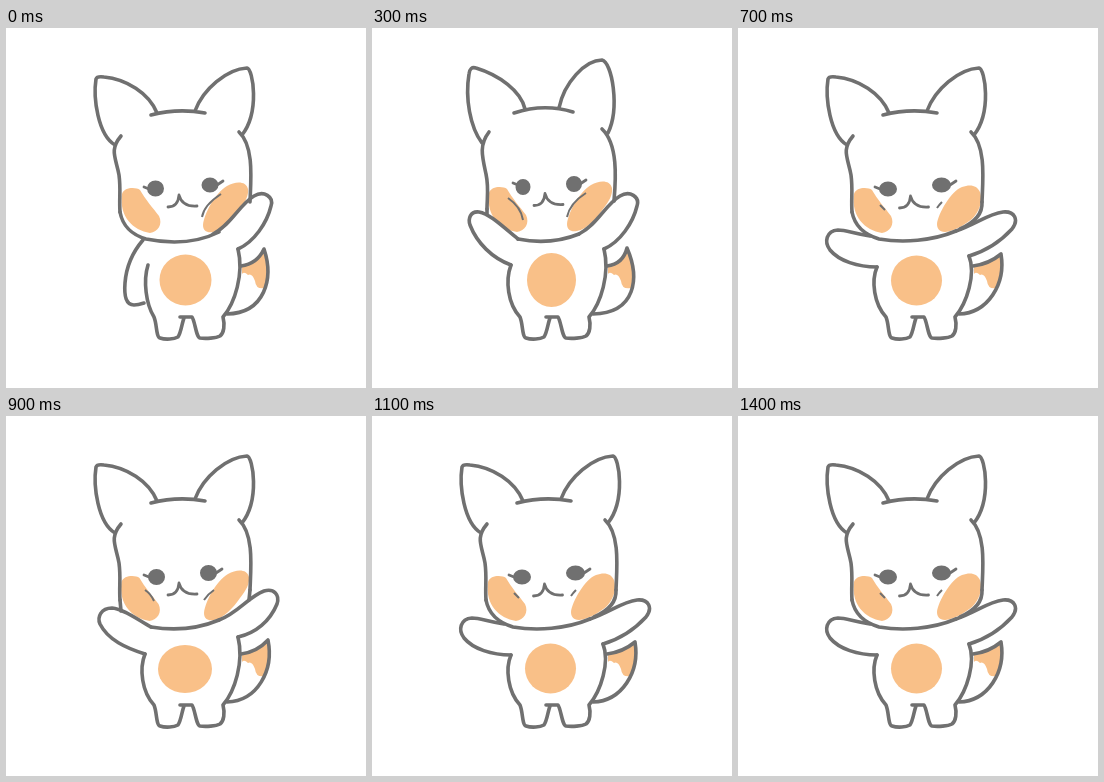
An HTML page that plays this animation: 360x360 px, repeating every 1500 ms.

```html
<!DOCTYPE html>
<html lang="en">
<head>
<meta charset="utf-8">
<title>Waving kitten</title>
<style>
  html, body { margin: 0; width: 100%; height: 100%; overflow: hidden; background: #fff; }
  svg { display: block; width: 100%; height: 100%; }
  .line { fill: none; stroke: #707070; stroke-width: 3.6; stroke-linecap: round; stroke-linejoin: round; }
  .face { stroke-width: 2.8; }
  .crease { stroke-width: 2; stroke-linecap: butt; }
  .orange { fill: #f9c088; }
  .eye { fill: #707070; }
</style>
</head>
<body>
<svg id="stage" viewBox="0 0 360 360"></svg>
<script>
const oval = (x, y, rx, ry) =>
  `M${x - rx} ${y}A${rx} ${ry} 0 1 1 ${x + rx} ${y}A${rx} ${ry} 0 1 1 ${x - rx} ${y}Z`;

const shift = (path, dx, dy) =>
  path.replace(/([\d.]+) ([\d.]+)/g, (_, x, y) => `${+x + dx} ${+y + dy}`);

const mix = (a, b, t) => {
  const to = b.match(/[\d.]+/g);
  let i = 0;
  return a.replace(/[\d.]+/g, n => +n + (to[i++] - n) * t);
};

const heads = {
  calm: "M109 117C92 107 87 70 90 51Q91 48 98 49C120 51 143 65 151 85" +
    "M189 83C197 61 221 41 241 40C247 41 254 84 236 107M145 87Q172 80 199 85" +
    "M115 108C103 122 110 130 113 147C115 162 113 170 114 184M233 104C248 118 245 150 244 174",
  up: "M110 115C98 99 93 70 97 46Q98 38 104 40C127 47 149 63 153 81" +
    "M187 80C192 55 213 32 230 32C240 34 248 80 236 105M142 85Q172 75 201 84" +
    "M117 104C107 117 110 128 114 146C117 160 115 170 115 181M230 101C246 116 244 150 242 173",
  drop: "M105 121C90 104 84 75 87 57Q89 52 95 54C118 55 141 68 149 86" +
    "M187 84C196 64 221 47 240 45C249 46 252 88 235 109M143 90Q172 82 199 89" +
    "M111 111C102 122 108 132 111 149C114 164 112 172 114 186M234 107C247 119 246 150 244 176"
};

const jaws = {
  wave: "M114 184C117 200 127 207 140 211C170 217 195 213 213 204",
  low: "M114 184C117 200 128 207 141 211C165 215 194 213 218 203M244 174Q245 191 222 201",
  up: "M115 181L115 186M146 211C170 216 192 212 207 206",
  mid: "M114 184L115 195M145 211C170 215 194 212 213 204M244 174L243 184"
};

const leftArms = {
  wave: "M137 212C125 226 120 242 119 255C118 268 120 277 128 277C131 277 135 276 138 275",
  up: "M146 211C130 198 118 186 107 184C98 183 96 191 98 197C105 215 120 230 139 237",
  low: "M132 208C114 205 108 202 100 202C88 203 86 214 92 222C101 233 120 239 139 239",
  mid: "M145 211C132 204 118 193 106 192C95 192 91 201 94 208C102 224 120 232 139 238"
};

const rightArms = {
  up: "M207 206C225 197 234 176 248 168C258 162 268 169 265 178C261 195 248 214 232 221",
  low: "M218 203C238 196 250 186 265 184C277 183 281 192 274 201C262 214 248 223 231 228",
  mid: "M213 204C232 197 242 181 258 175C268 172 274 179 271 188C264 205 250 217 232 221"
};

const legs = "M148 289C151 296 150 309 154 310C160 312 168 311 172 309C175 305 176 295 178 290" +
  "M174 289L186 289C189 293 190 309 194 310C200 311 210 310 214 308C218 305 219 297 217 289";
const body = (x, bend, y, top) =>
  `M${x} ${y}C${bend} 253 ${bend + 3} 276 148 289M${top > 225 ? 231 : 232} ${top}C238 246 229 275 217 289` + legs;

const tail = (x, y) => `M235 238Q251 236 ${x} ${y}C268 ${y + 30} ${264 - 1.75 * (x - 255)} 285 221 286`;
const tailTip = (x, y) => `M236 238Q251 236 ${x} ${y}Q264 ${y + 18} 259 260` +
  "Q250 262 249 253Q246 245 242 247Q238 243 236 246Z";

const cheekLeft = "M116 166C118 159 130 159 134 162C139 171 147 180 153 188C157 196 152 204 144 205C127 202 113 189 116 166Z";
const cheekFull = "M199 196C200 186 213 163 224 159C232 156 239 157 242 164C245 174 241 184 234 191C225 198 216 203 207 204C201 204 199 200 199 196Z";
const cheekCut = "M195 196C196 185 207 164 219 157C228 152 238 152 240 160C241 166 237 174 231 181C224 191 215 201 205 203C199 204 195 202 195 196Z";
const cheeks = (lx, ly, right, rx, ry) => shift(cheekLeft, lx, ly) + shift(right, rx, ry);

const lash = (lx, ly, rx, ry) => `M${lx} ${ly}L${lx + 5} ${ly + 2}M${rx} ${ry}L${rx + 6} ${ry - 4}`;
const mouth = (x, y) => `M${x - 11} ${y + 12}Q${x - 1} ${y + 12} ${x} ${y}Q${x + 3} ${y + 12} ${x + 18} ${y + 11}`;
const shortCrease = "M142 177Q144 179 147 182M199 180Q201 177 204 174";

const wave = {
  tailTip: tailTip(258, 221), tail: tail(258, 221),
  belly: oval(179.5, 252, 26, 25.5), cheeks: cheeks(0, 0, cheekCut, 2, 1),
  head: heads.calm, jaw: jaws.wave, leftArm: leftArms.wave, rightArm: rightArms.up,
  body: body(142, 137, 237, 221),
  eyes: oval(149.5, 160.5, 8.5, 8) + oval(204, 157, 8.5, 7.5),
  face: lash(138, 159, 211, 157) + mouth(173, 167),
  crease: "M145 178Q145 178 145 178M196 189Q198 177 215 166"
};
const up = {
  tailTip: tailTip(255, 220), tail: tail(255, 220),
  belly: oval(179.5, 252, 24.5, 27), cheeks: cheeks(1, -1, cheekCut, 0, 0),
  head: heads.up, jaw: jaws.up, leftArm: leftArms.up, rightArm: rightArms.up,
  body: body(139, 133, 237, 221),
  eyes: oval(151, 159, 7.5, 8) + oval(202, 156, 8, 8),
  face: lash(141, 155, 208, 156) + mouth(173, 165.5),
  crease: "M136 170Q149 179 151 192M195 189Q198 175 214 165"
};
const low = {
  tailTip: tailTip(263, 226), tail: tail(263, 226),
  belly: oval(178.5, 252.5, 25.5, 25), cheeks: cheeks(0, 0, cheekFull, 0, 0),
  head: heads.calm, jaw: jaws.low, leftArm: leftArms.low, rightArm: rightArms.low,
  body: body(139, 133, 239, 228),
  eyes: oval(150, 161, 9, 7.5) + oval(203.5, 157, 9.5, 7.5),
  face: lash(137, 159, 212, 157) + mouth(172.5, 168),
  crease: shortCrease
};
const drop = {
  ...low,
  tailTip: tailTip(265, 227), tail: tail(265, 227),
  cheeks: cheeks(-2, 1, cheekFull, 0, 1), head: heads.drop,
  eyes: oval(148, 162.5, 9.5, 7.5) + oval(203, 158, 9.5, 7.5),
  face: lash(135, 160, 212, 158) + mouth(171, 168.5)
};
const mid = {
  ...low,
  tailTip: tailTip(262, 224), tail: tail(262, 224),
  belly: oval(179, 253, 27, 24), cheeks: cheeks(-0.5, 0, cheekCut, 3, 1),
  jaw: jaws.mid, leftArm: leftArms.mid, rightArm: rightArms.mid,
  body: body(139, 133, 238, 221),
  eyes: oval(150.5, 161, 8.5, 8) + oval(202.5, 157, 8.5, 8),
  face: lash(138, 159, 210, 157) + mouth(173, 167),
  crease: "M139 174Q145 178 148 185M198 184Q202 178 208 174"
};
// The jaw paths differ in structure, so the lifting pose keeps the waving one.
const lift = Object.fromEntries(Object.keys(wave).map(k =>
  [k, k === "jaw" ? wave.jaw : mix(wave[k], up[k], 0.5)]));

// One pose per 100 ms.
const timeline = [wave, wave, lift, up, mid, drop, mid, low, low, mid, up, low, low, up, low];

const styles = {
  tailTip: "orange", belly: "orange", cheeks: "orange", tail: "line", head: "line", jaw: "line",
  leftArm: "line", rightArm: "line", body: "line", eyes: "eye", face: "line face", crease: "line crease"
};
const stage = document.getElementById("stage");
const parts = {};
for (const name in styles) {
  const path = document.createElementNS("http://www.w3.org/2000/svg", "path");
  path.setAttribute("class", styles[name]);
  parts[name] = stage.appendChild(path);
}

function draw(now) {
  const pose = timeline[Math.floor(now % 1500 / 100)];
  for (const name in parts) parts[name].setAttribute("d", pose[name]);
  requestAnimationFrame(draw);
}
draw(performance.now());
</script>
</body>
</html>
```
